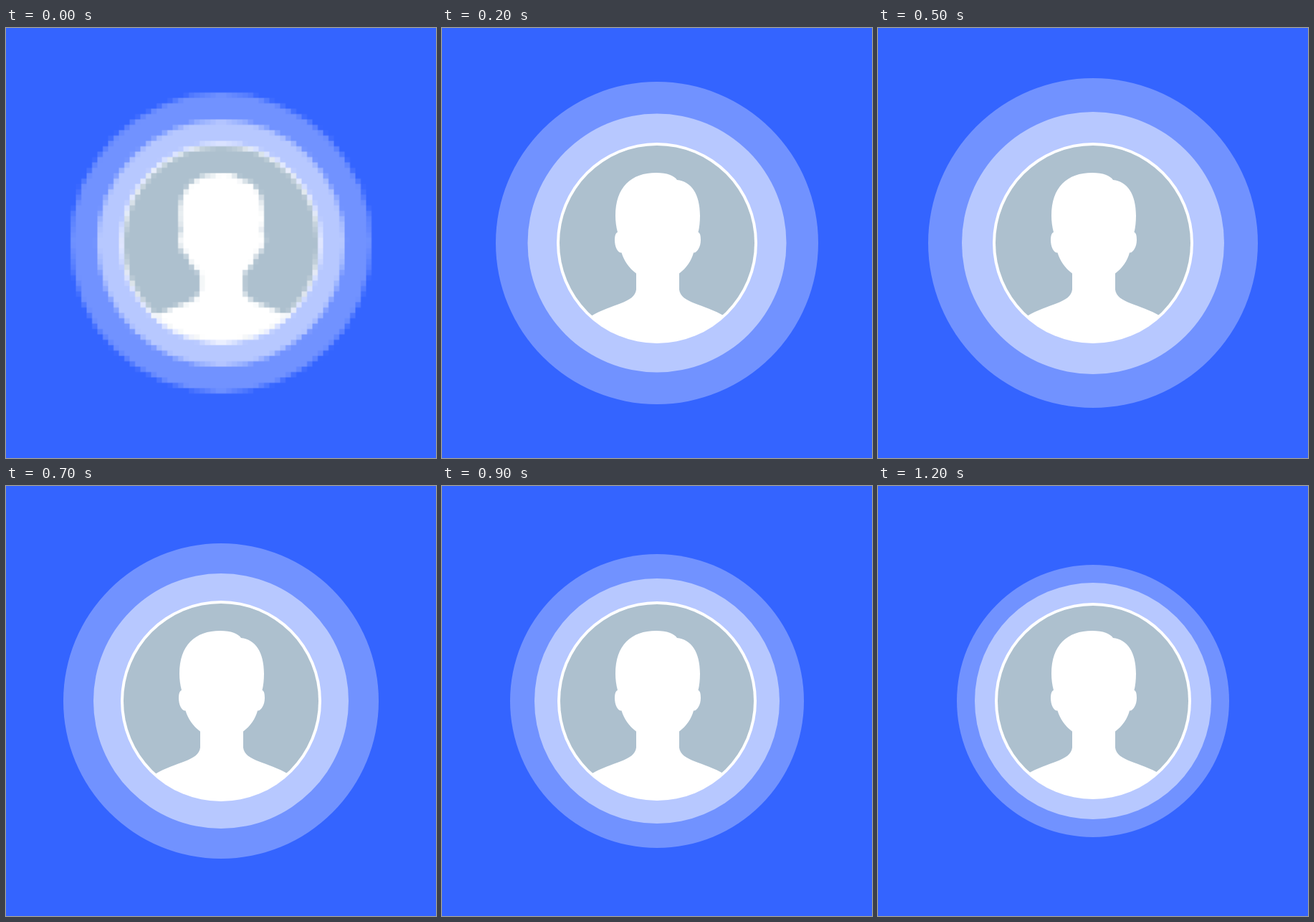
An HTML page with a canvas that plays this animation: 600 by 600 pixels, repeating every 1.3 s.

```html
<!DOCTYPE html>
<html lang="en">
<head>
<meta charset="utf-8">
<title>Pulsing avatar</title>
<style>
  html, body { margin: 0; width: 100%; height: 100%; overflow: hidden; background: #3464ff; }
  canvas { display: block; width: 600px; height: 600px; }
</style>
</head>
<body>
<canvas id="stage" width="600" height="600"></canvas>
<script>
const SIZE = 600, CENTER = 300, STEP = 100;
// Outer ring radius for each step of the pulse
const pulse = [210, 220, 225, 230, 235, 230, 225, 220, 210, 205, 200, 195, 190];

const person = new Path2D(
  'M299 202 C314 202 324 206 328 212 C348 214 360 232 360 262 C360 271 359 279 357.5 285 ' +
  'C360.5 286 361 291 361 296 C361 305 356 314 351 313.5 C348 325 341 335 331 342.5 ' +
  'V365 C333 384 366 385 394 402 L450 450 H150 L208 402 C236 385 269 384 271 365 ' +
  'V342.5 C261 335 254 325 250.5 313.5 C245 314 241 305 241 296 C241 291 242 286 245 285 ' +
  'C243 277 242 270 242 262 C242 222 264 202 299 202 Z');

function makeCanvas(size) {
  const canvas = document.createElement('canvas');
  canvas.width = canvas.height = size;
  return canvas.getContext('2d');
}

const stage = document.getElementById('stage').getContext('2d');
const thumb = makeCanvas(80);
const blocks = makeCanvas(320);

function disc(ctx, radius, color) {
  ctx.beginPath();
  ctx.arc(CENTER, CENTER, radius, 0, Math.PI * 2);
  ctx.fillStyle = color;
  ctx.fill();
}

function drawScene(ctx, radius) {
  const scale = ctx.canvas.width / SIZE;
  const inner = 173 + (radius - 210) * (radius > 210 ? 0.5 : 0.4);
  const avatar = Math.min(140, 137 + (radius - 190) * 2 / 15);
  ctx.save();
  ctx.scale(scale, scale);
  ctx.fillStyle = '#3464ff';
  ctx.fillRect(0, 0, SIZE, SIZE);
  disc(ctx, radius, '#7192ff');
  disc(ctx, inner, '#b7c8ff');
  disc(ctx, avatar, '#fff');
  disc(ctx, avatar - 4, '#adc0ce');
  ctx.beginPath();
  ctx.arc(CENTER, CENTER, avatar - 1, 0, Math.PI * 2);
  ctx.clip();
  ctx.fillStyle = '#fff';
  ctx.fill(person);
  ctx.restore();
}

// The pulse opens on a coarse, enlarged thumbnail
function drawCoarse(radius) {
  drawScene(thumb, radius);
  blocks.imageSmoothingEnabled = false;
  blocks.drawImage(thumb.canvas, 0, 0, 320, 320);
  stage.drawImage(blocks.canvas, 0, 0, SIZE, SIZE);
}

let shown = -1;
const start = performance.now();

function tick() {
  const elapsed = performance.now() - start;
  const step = Math.floor(elapsed / STEP) % pulse.length;
  if (step !== shown) {
    shown = step;
    if (step === 0) drawCoarse(pulse[step]);
    else drawScene(stage, pulse[step]);
  }
  requestAnimationFrame(tick);
}
tick();
</script>
</body>
</html>
```
